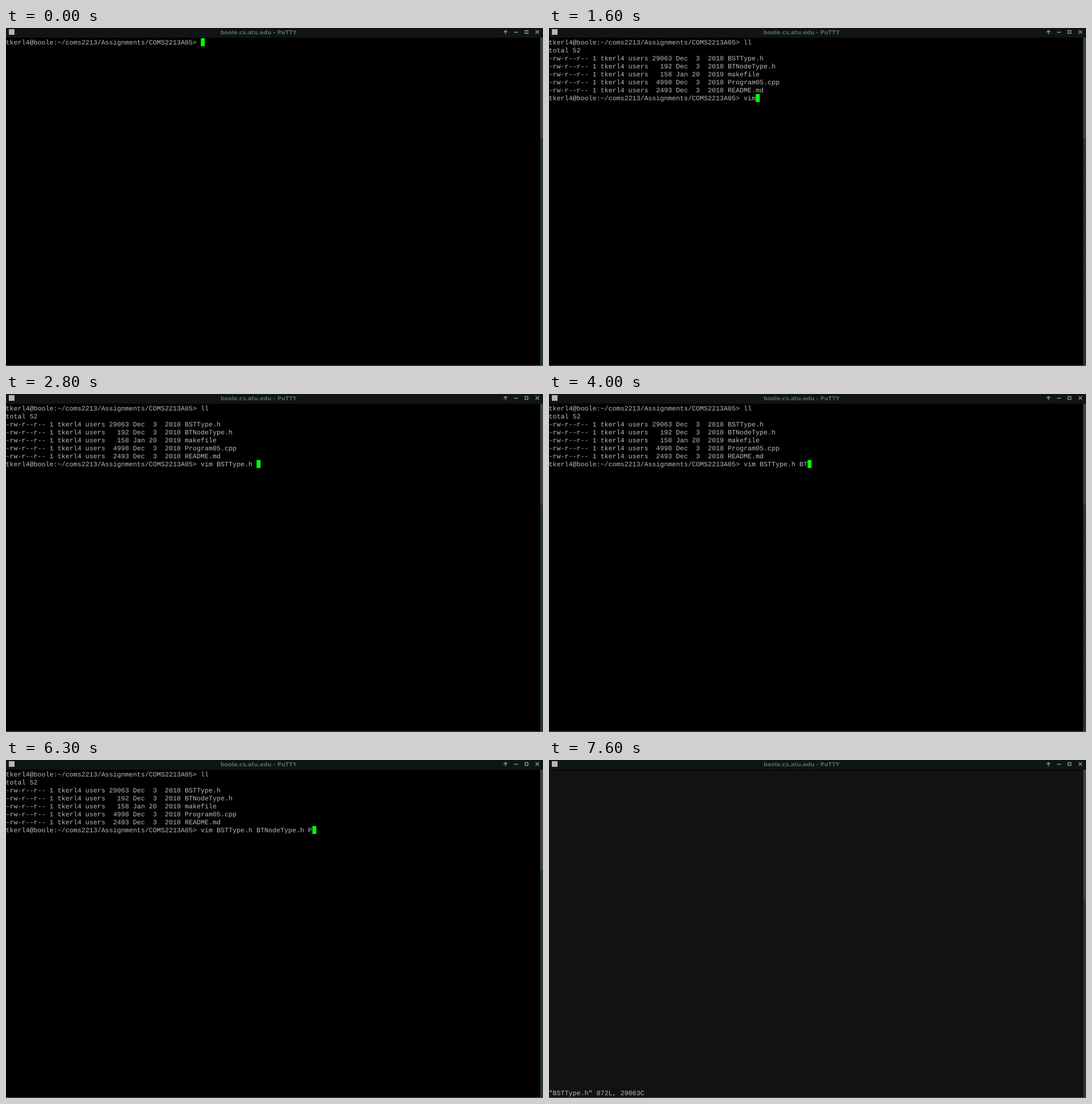
Recreate the animation shown at these times as an HTML page. Size 944x594 px, loop 8000 ms.

```html
<!DOCTYPE html>
<html lang="en">
<head>
<meta charset="utf-8">
<title>Terminal session</title>
<style>
  html, body { margin: 0; width: 100%; height: 100%; overflow: hidden; background: #000; }
  svg { display: block; }
  text { white-space: pre; text-rendering: geometricPrecision; }
  .term { font: 11.667px "Liberation Mono", monospace; fill: #bbb; }
  .title { font: bold 9.5px "DejaVu Sans", sans-serif; fill: #5c6465; }
</style>
</head>
<body>
<svg width="944" height="594" viewBox="0 0 944 594">
  <defs>
    <pattern id="grain" width="4" height="4" patternUnits="userSpaceOnUse">
      <rect width="4" height="4" fill="#273130"/>
      <path d="M0 4L4 0" stroke="#344040"/>
    </pattern>
  </defs>
  <rect width="944" height="594"/>
  <rect id="screen" y="18" width="938" height="575" fill="#121212"/>
  <rect width="944" height="17" fill="#0f1516"/>
  <rect x="5" y="2" width="10" height="10" fill="#b4b6bd"/>
  <text class="title" x="444" y="11" text-anchor="middle">boole.cs.atu.edu - PuTTY</text>
  <g fill="none" stroke="#899192" stroke-width="1.5">
    <path d="M878 11V4.5M874.7 7.5L878 4.2L881.3 7.5"/>
    <path d="M893 7.5H900"/>
    <rect x="912.5" y="4.5" width="5" height="5"/>
    <path d="M931 4L937 10M937 4L931 10"/>
  </g>
  <rect x="939" y="17" width="5" height="576" fill="url(#grain)"/>
  <rect id="thumb" x="939" y="17" width="5" fill="#3d4444"/>
  <rect y="593" width="944" height="1" fill="#555a5a"/>
  <g id="rows" class="term"></g>
  <rect id="cursor" width="7" height="14" fill="#0f0"/>
</svg>
<script>
const LOOP = 8000, CELL = 7, ROW = 14, LEFT = -0.5, TOP = 18, LAST_ROW = 40;
const USER = "tkerl4";
const PROMPT = USER + "@boole:~/coms2213/Assignments/COMS2213A05> ";
const $ = id => document.getElementById(id);

const file = (size, date, name) =>
  `-rw-r--r-- 1 ${USER} users ${String(size).padStart(5)} ${date} ${name}`;
const listing = [
  "total 52",
  file(29063, "Dec  3  2018", "BSTType.h"),
  file(192, "Dec  3  2018", "BTNodeType.h"),
  file(158, "Jan 20  2019", "makefile"),
  file(4998, "Dec  3  2018", "Program05.cpp"),
  file(2493, "Dec  3  2018", "README.md")
];

// Each key press: [time, characters entered so far]
const LIST_CMD = "ll", LIST_KEYS = [[400, 1], [600, 2]];
const EDIT_CMD = "vim BSTType.h BTNodeType.h Program05.cpp ";
const EDIT_KEYS = [
  [1400, 1], [1500, 2], [1600, 3], [1700, 4],
  [1900, 5], [2000, 6], [2100, 7], [2500, 8], [2800, 14],
  [3900, 15], [4000, 16], [4200, 17], [4400, 18], [4600, 20], [4800, 27],
  [6300, 28], [6500, 29], [6700, 30], [6800, 41]
];
const LISTED = 700, LAUNCH = 7500, EDITOR = 7600;

function typed(cmd, keys, t) {
  let n = 0;
  for (const [at, count] of keys) if (t >= at) n = count;
  return PROMPT + cmd.slice(0, n);
}

function shellLines(t) {
  const lines = [typed(LIST_CMD, LIST_KEYS, t)];
  if (t >= LISTED) lines.push(...listing, typed(EDIT_CMD, EDIT_KEYS, t));
  if (t >= LAUNCH) lines.push("3 files to edit", "");
  return lines;
}

const rows = Array.from({ length: LAST_ROW + 1 }, (_, i) => {
  const el = document.createElementNS("http://www.w3.org/2000/svg", "text");
  el.setAttribute("x", LEFT);
  el.setAttribute("y", TOP + ROW * i + 11);
  return $("rows").appendChild(el);
});

function draw(t) {
  const editing = t >= EDITOR;
  const lines = editing ? [] : shellLines(t);
  if (editing) lines[LAST_ROW] = '"BSTType.h" 872L, 29063C';
  rows.forEach((el, i) => {
    const s = lines[i] || "";
    if (el.textContent !== s) el.textContent = s;
  });
  const last = lines.length - 1;
  $("cursor").setAttribute("x", LEFT + CELL * lines[last].length);
  $("cursor").setAttribute("y", TOP + ROW * last);
  $("cursor").setAttribute("visibility", editing ? "hidden" : "visible");
  $("screen").setAttribute("visibility", editing ? "visible" : "hidden");
  $("rows").setAttribute("fill", editing ? "#c6c6c6" : "#bbb");
  $("thumb").setAttribute("height", editing ? 230 : 177);
}

const start = performance.now();
function tick() {
  draw((performance.now() - start) % LOOP);
  requestAnimationFrame(tick);
}
tick();
</script>
</body>
</html>
```
